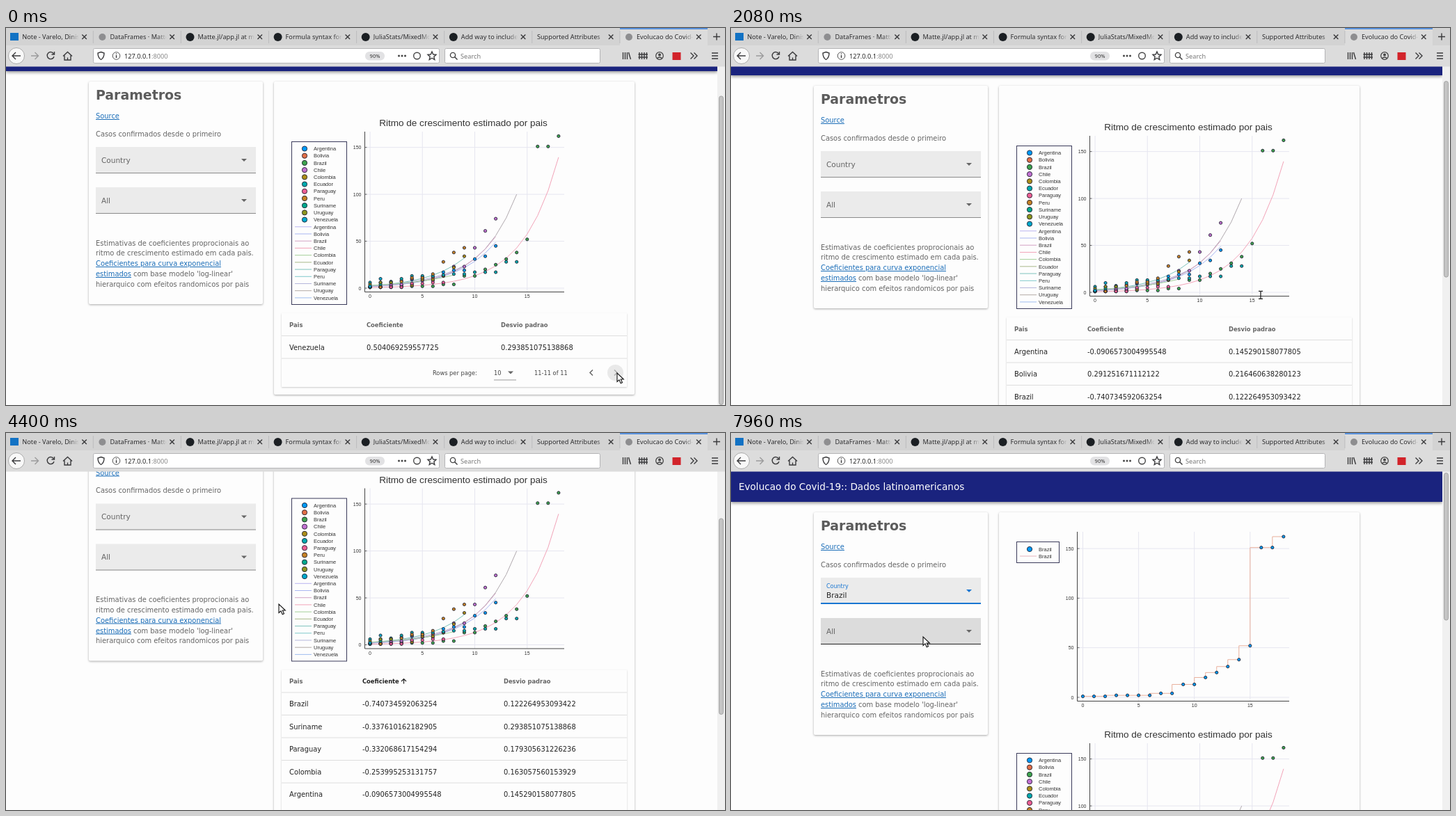
Recreate the animation shown at these times as an HTML page. Size 1033 by 542 pixels, loop 8 s.

```html
<!DOCTYPE html>
<html lang="pt">
<head>
<meta charset="utf-8">
<style>
html, body { margin: 0; height: 100%; overflow: hidden; background: #fdfdfd; }
svg { display: block; }
#view { font-family: "DejaVu Sans", sans-serif; }
.plot { font-family: "Liberation Sans", sans-serif; fill: #333; }
.ui { font: 9.2px "Noto Sans", sans-serif; }
.card { filter: drop-shadow(0 1px 1.5px #0005); }
.table { filter: drop-shadow(0 1px 1px #0003); }
.menu { filter: drop-shadow(0 3px 4px #0007); }
.icon { fill: none; stroke: #3a3a3c; stroke-width: 1.4; }
</style>
</head>
<body>
<svg id="view" width="1033" height="542" viewBox="0 0 1033 542"></svg>
<script>
const view = document.getElementById('view');
const GREY = '#646464', DARK = '#222', BLUE = '#1976d2', LINK = '#1a6db8', PAPER = '#fdfdfd', TABS = '#d3d3d3', BAR = '#dcdcdc';

// SVG helpers
const rect = (x, y, w, h, fill, more = '') => `<rect x="${x}" y="${y}" width="${w}" height="${h}" fill="${fill}" ${more}/>`;
const circle = (x, y, r, fill, more = '') => `<circle cx="${x}" cy="${y}" r="${r}" fill="${fill}" ${more}/>`;
const path = (d, more = 'class="icon"') => `<path d="${d}" ${more}/>`;
const line = (x1, y1, x2, y2, stroke, w = 1) => path(`M${x1} ${y1}L${x2} ${y2}`, `fill="none" stroke="${stroke}" stroke-width="${w}"`);
const text = (x, y, s, size, fill, more = '') => `<text x="${x}" y="${y}" font-size="${size}" fill="${fill}" ${more}>${s}</text>`;
const group = (s, more) => `<g ${more}>${s}</g>`;
const caret = (x, y, fill = '#666') => path(`M${x - 4} ${y - 2}h8l-4 4z`, `fill="${fill}"`);
const BOLD = 'font-weight="bold"', MID = 'text-anchor="middle"', END = 'text-anchor="end"';

// ---- data ----
const countries = ['Argentina', 'Bolivia', 'Brazil', 'Chile', 'Colombia', 'Ecuador', 'Paraguay', 'Peru', 'Suriname', 'Uruguay', 'Venezuela'];
const colors = ['#009afa', '#e36f47', '#3ea44e', '#c371d2', '#ac8e18', '#00aaae', '#ed5e93', '#c68225', '#00a98d', '#8e971e', '#00a9cc'];
const lineColors = ['#b9b4f0', '#a9b6f2', '#d3a3c4', '#f2a3b8', '#a5cf9a', '#a9b98a', '#7fc4bd', '#7fc9cc', '#b4b6dc', '#b3aaa6', '#9fbdf0'];
const brazil = [1, 1, 1, 2, 2, 2, 2, 4, 4, 13, 13, 20, 25, 31, 38, 52, 151, 151, 162];
const cases = [
  [1, 1, 2, 8, 9, 12, 12, 17, 19, 19, 31, 34, 45],
  [2, 2, 3, 3, 10, 10, 11],
  brazil,
  [1, 1, 4, 4, 4, 8, 8, 13, 23, 23, 43, 61, 74],
  [1, 1, 1, 1, 3, 9, 9, 13, 22, 34],
  [6, 6, 7, 10, 13, 13, 13, 14, 15, 15, 17, 17, 17, 28, 28],
  [1, 1, 1, 1, 5, 5, 6, 6],
  [1, 1, 6, 7, 11, 11, 15, 28, 38, 43],
  [1, 4],
  [4, 6, 6],
  [2, 10]
];
// fitted curves: last day, value there, growth rate, colour
const fits = [
  [18, 139.5, .295, '#f2a3b8'], [14, 100, .29, '#b0a9ae'], [12, 55, .28, '#d3a3c4'],
  [12, 49, .27, '#a9b6f2'], [9, 32, .28, '#7fc4bd'], [9, 24, .25, '#b4b6dc'], [8, 14, .2, '#a5cf9a']
];
const values = {
  Argentina: ['-0.0906573004995548', '0.145290158077805'],
  Bolivia: ['0.291251671112122', '0.216460638280123'],
  Brazil: ['-0.740734592063254', '0.122264953093422'],
  Chile: ['0.0534670252872249', '0.145290158077805'],
  Colombia: ['-0.253995253131757', '0.163057560153929'],
  Suriname: ['-0.337610162182905', '0.293851075138868'],
  Paraguay: ['-0.332068617154294', '0.179305631226236'],
  Venezuela: ['0.504069259557725', '0.293851075138868']
};
const byName = countries.slice(0, 5);
const byValue = ['Brazil', 'Suriname', 'Paraguay', 'Colombia', 'Argentina'];
const options = ['Brazil', 'Uruguay', 'Argentina', 'Chile', 'Paraguay', 'Peru'];

// ---- charts ----
function axes(left, top, bottom, X, Y) {
  let s = '';
  for (const d of [0, 5, 10, 15]) {
    s += line(X(d), top, X(d), bottom, '#e6e6f0') + text(X(d), bottom + 8.5, d, 7, '#333', MID);
  }
  for (const v of [0, 50, 100, 150]) {
    s += line(left, Y(v), 802, Y(v), '#e6e6f0') + line(left, Y(v), left + 3, Y(v), '#444', .8) + text(left - 5, Y(v) + 2.6, v, 7, '#333', END);
  }
  return s + path(`M${left} ${top}V${bottom}H802`, 'fill="none" stroke="#444"');
}
const dot = (x, y, fill) => circle(x, y, 2.1, fill, 'stroke="#223" stroke-width=".9"');
const mark = (y, fill) => circle(429, y, 3.6, fill, 'stroke="#223" stroke-width=".9"');
const label = (y, s) => text(442, y + 2.7, s, 7.5, '#333');
const legendBox = (y, w, h) => rect(410.5, y, w, h, PAPER, 'stroke="#3a3a5a"');

function mainChart() {
  const X = d => 523 + d * 15.05, Y = v => 411 - v * 1.349;
  let s = text(657, 178, 'Ritmo de crescimento estimado por pais', 13.55, '#333', MID);
  s += axes(515.5, 186, 416.5, X, Y);
  for (const [last, top, k, color] of fits) {
    let d = '';
    for (let i = 0; i <= last; i++) d += (i ? 'L' : 'M') + X(i) + ' ' + Y(top * Math.exp(k * (i - last)));
    s += path(d, `fill="none" stroke="${color}"`);
  }
  cases.forEach((list, c) => list.forEach((v, i) => s += dot(X(i), Y(v), colors[c])));
  s += legendBox(200.5, 79, 234);
  countries.forEach((name, i) => {
    const y = 210.5 + i * 10.21, y2 = y + 112.3;
    s += mark(y, colors[i]) + label(y, name) + line(415, y2, 439, y2, lineColors[i]) + label(y2, name);
  });
  return group(s, 'class="plot"');
}

function brazilChart() {
  const X = d => 505.5 + d * 16.02, Y = v => 380 - v * 1.426;
  let d = `M${X(0)} ${Y(1)}`;
  brazil.forEach((v, i) => d += `V${Y(v)}H${X(i)}`);
  let s = axes(497.5, 142, 385.5, X, Y) + path(d, 'fill="none" stroke="#e9b09c"');
  brazil.forEach((v, i) => s += dot(X(i), Y(v), colors[0]));
  s += legendBox(156.5, 61, 30) + mark(167, colors[0]) + label(167, 'Brazil') + line(415, 177, 439, 177, '#e6b3bd') + label(177, 'Brazil');
  return group(s, 'class="plot"');
}
const MAIN = mainChart(), EXTRA = brazilChart();

// ---- page ----
function select(y, name, value, hover, focus) {
  const color = focus ? BLUE : '#666';
  return rect(129, y, 230, 38, hover ? '#dcdcdc' : '#ebebeb') +
    rect(129, y + (focus ? 36 : 37), 230, focus ? 2 : 1, focus ? BLUE : hover ? '#222' : '#8a8a8a') +
    (value ? text(137, y + 15, name, 8, color) + text(137, y + 29, value, 10.5, DARK) : text(137, y + 22.5, name, 10.5, GREY)) +
    caret(342, y + 19, color);
}

function leftCard(p) {
  const body = (y, s) => text(129, y, s, 9.9, GREY);
  const link = s => `<tspan fill="${LINK}" text-decoration="underline">${s}</tspan>`;
  return rect(119, 114, 250, 320, PAPER, 'rx="2" class="card"') +
    text(129, 140, 'Parametros', 18.9, '#5c5c5c', BOLD) +
    body(167, link('Source')) +
    body(192.5, 'Casos confirmados desde o primeiro') +
    select(208, 'Country', p.chosen && 'Brazil', p.hoverCountry, p.chosen) +
    select(266, 'All', '', p.hoverAll) +
    body(349.5, 'Estimativas de coeficientes proprocionais ao') +
    body(364, 'ritmo de crescimento estimado em cada pais.') +
    body(379, link('Coeficientes para curva exponencial')) +
    body(394, link('estimados') + " com base modelo 'log-linear'") +
    body(408.5, 'hierarquico com efeitos randomicos por pais');
}

const sortArrow = (x, color) => path(`M${x} 467v-7M${x - 3.5} 463.500l3.500-3.500l3.500 3.500`, `fill="none" stroke="${color}" stroke-width="1.2"`);

function table(p) {
  const one = p.rows === 1, x2 = one ? 518 : 512, x3 = one ? 711 : 715, end = 479.5 + p.rows * 32.5;
  const head = (x, s, color = GREY) => text(x, 466.5, s, 8.35, color, BOLD);
  let s = rect(396, 447, 496, end - 406, PAPER, 'class="table"') +
    head(407, 'Pais') + head(x2, 'Coeficiente', p.sorted ? DARK : GREY) + head(x3, 'Desvio padrao') +
    (p.arrow2 ? sortArrow(571.5, p.sorted ? DARK : '#ccc') : '') + (p.arrow3 ? sortArrow(789.5, '#ddd') : '');
  (one ? ['Venezuela'] : p.sorted ? byValue : byName).forEach((name, i) => {
    const y = 479.5 + i * 32.5;
    if (i === p.hoverRow) s += rect(396, y, 496, 32.5, '#eaeaea');
    s += line(396, y, 892, y, '#dedede');
    [name, ...values[name]].forEach((v, c) => s += text([407, x2, x3][c], y + 20.2, v, 9.9, DARK));
  });
  s += line(396, end, 892, end, '#dedede');
  const small = (x, str) => text(x, end + 23.5, str, 8.25, '#444');
  const chevron = (x, k, color) => path(`M${x - 2 * k} ${end + 16.5}l${4 * k} 4l${-4 * k} 4`, `fill="none" stroke="${color}" stroke-width="1.5"`);
  return s + small(613, 'Rows per page:') + small(701, '10') + line(701, end + 31, 733, end + 31, '#999') + caret(725, end + 20.5) +
    small(759, one ? '11-11 of 11' : '1-10 of 11') + chevron(841, -1, '#666') +
    (one ? circle(875.5, end + 20.5, 11.5, '#e9e9e9') : '') + chevron(876, 1, one ? '#aaa' : '#666');
}

function menu(p) {
  let s = rect(129, 208, 229, 205, PAPER, 'class="menu"');
  options.forEach((name, i) => {
    const y = 213 + i * 32.5;
    if (i === p.hoverOption) s += rect(129, y, 218, 32.5, '#f2f2f2');
    s += text(140, y + 20.3, name, 10.4, DARK);
  });
  s += rect(347, 208, 11, 205, '#f0f0f0') + rect(349.5, 210, 7, 102, '#bdbdbd', 'rx="3.5" stroke="#999" stroke-width=".6"');
  return group(s, `opacity="${p.menu}"`);
}

function scrollbar(scroll, height) {
  const thumb = 486 * 486 / height - 8;
  return rect(1022, 55, 11, 487, '#f0f0f0') +
    rect(1024.5, 57.5 + scroll * (484 - thumb) / (height - 486), 6, thumb, '#c4c4c4', 'rx="3" stroke="#999" stroke-width=".8"');
}

function page(p) {
  const shift = p.extra ? 260 : 0;
  const s = rect(0, 40, 1022, 59, '#1a237e', 'style="filter:drop-shadow(0 2px 2px #0006)"') +
    text(11, 82, 'Evolucao do Covid-19:: Dados latinoamericanos', 13.55, '#fff') +
    leftCard(p) +
    rect(385, 114, 518, 417.5 + p.rows * 32.5 + shift, PAPER, 'rx="2" class="card"') +
    (p.extra ? EXTRA : '') + group(MAIN + table(p), `transform="translate(0 ${shift})"`) +
    (p.menu ? menu(p) : '');
  return rect(0, 0, 1033, 542, PAPER) + group(s, `transform="translate(0 ${-p.scroll})"`) +
    scrollbar(p.scroll, 490.5 + p.rows * 32.5 + shift);
}

// ---- browser frame ----
function browser() {
  const titles = ['Note - Varelo, Dinis', 'DataFrames · Matte.jl', 'Matte.jl/app.jl at master', 'Formula syntax for', 'JuliaStats/MixedModels', 'Add way to include', 'Supported Attributes', 'Evolucao do Covid-19'];
  let s = rect(0, 0, 1033, 26, TABS) + rect(0, 25, 1033, 30.5, BAR) + rect(882, 0, 126, 26, BAR) + rect(882, 0, 126, 2, '#5a92dc');
  titles.forEach((title, i) => {
    const x = 882 - 126.1 * (7 - i), tx = i === 6 ? 7 : 24;
    s += `<svg x="${x + tx}" y="0" width="${105 - tx}" height="25"><text y="16" fill="#2c2c2e">${title}</text></svg>`;
    s += rect(x + 92, 3, 15, 20, `url(#fade${i === 7 ? 1 : 0})`);
    if (i === 0) s += rect(6, 7, 12, 11, '#1272c4');
    else if (i === 1 || i === 7) s += circle(x + 13, 13, 5, '#8e8e90');
    else if (i !== 6) s += circle(x + 13, 13, 6, '#1b1f23');
    s += path(`M${x + 110} 9.5l6.5 6.5m0-6.5l-6.5 6.5`);
    if (i < 7) s += line(x + 126, 4, x + 126, 22, '#bcbcbe');
  });
  s += path('M1016 12.5h10M1021 7.5v10');
  // navigation
  s += circle(15, 40, 11.5, '#f8f8f8', 'stroke="#aaa"') + path('M21 40H9.5M14 35l-5 5l5 5') +
    group(path('M36 40h10M41.5 35l5 5l-5 5'), 'opacity=".4"') +
    path('M68.5 37a5 5 0 1 0 .5 4M69.5 34v4h-4') + path('M82 40.5l6.5-6l6.5 6M84 39.5v6.5h9v-6.5M88.5 46v-3.5');
  // address bar
  s += rect(125.5, 29.5, 497, 21, '#fff', 'rx="2" stroke="#b4b4b6"') +
    path('M136.5 34.5l4.5 1.5c0 5-1 7.5-4.5 9.5c-3.5-2-4.5-4.5-4.5-9.5z') +
    circle(158.5, 40, 5.3, 'none', 'stroke="#555"') + path('M158.5 39v4M158.5 36.5v1.2') +
    `<text x="170" y="43.5" fill="#222">127.0.0.1<tspan fill="#888">:8000</tspan></text>` +
    rect(516, 34, 28, 12.5, '#e2e2e4', 'rx="6"') + text(530, 43, '90%', 7.5, '#333', MID) +
    [564.5, 569, 573.5].map(x => circle(x, 40, 1.5, '#444')).join('') +
    circle(590.5, 40, 4.8, 'none', 'stroke="#444" stroke-width="1.4"') +
    path('M612 34l1.8 4l4.2 .4l-3.2 2.8l1 4.3l-3.8-2.3l-3.8 2.3l1-4.3l-3.2-2.8l4.2-.4z');
  // search and toolbar
  s += rect(630.5, 29.5, 223, 21, '#fff', 'rx="2" stroke="#b4b4b6"') + circle(642, 39, 3.6, 'none', 'stroke="#444" stroke-width="1.4"') +
    path('M644.5 41.5l4 4') + text(653, 43.5, 'Search', 9.2, '#777') +
    path('M886.5 35v10M889.5 35v10M892.5 35v10M894.5 35l3 10') +
    path('M910 35v10M913.5 35v10M917 35v10M920.5 35v10M908.5 38h13.5M908.5 42h13.5') +
    circle(939, 40, 5.3, 'none', 'stroke="#444" stroke-width="1.3"') + circle(939, 38.5, 2, '#444') + path('M935.5 43.5q3.5-3 7 0') +
    rect(957.5, 35, 12, 11, '#d2232a') + path('M983.5 35.5l4.5 4.5l-4.5 4.5M988.5 35.5l4.5 4.5l-4.5 4.5') +
    path('M1014 36h9M1014 40h9M1014 44h9');
  const fade = (i, c) => `<linearGradient id="fade${i}"><stop stop-color="${c}" stop-opacity="0"/><stop offset=".9" stop-color="${c}"/></linearGradient>`;
  return `<defs>${fade(0, TABS)}${fade(1, BAR)}</defs>` + group(s, 'class="ui"');
}

const pointers = {
  arrow: path('M0 0v12.5l3-2.7l2.2 5l2.3-1l-2.2-4.8h4z', 'fill="#fff" stroke="#111" stroke-width="1.1"'),
  hand: path('M0 1.2q1-1.6 2.2 0v4l5.8 1.3v3.5l-1.2 2.5h-6l-3.6-4.5q.6-1.4 2.8 .2z', 'fill="#fff" stroke="#111" stroke-width="1.1"'),
  beam: path('M-3-5.5h2.3l.7 .7l.7-.7h2.3M-3 5.5h2.3l.7-.7l.7 .7h2.3M0-5v10', 'fill="none" stroke="#222" stroke-width="1.3"')
};

// ---- timeline: [ms, values...] ----
const moves = [[40, 878, 496], [440, 843, 493], [1440, 843, 493], [1800, 782, 463], [2200, 752, 350], [2280, 735, 352], [2400, 595, 374], [2680, 541, 352], [3640, 541, 352],
  [4400, 392, 246], [4520, 372, 240], [5119, 372, 240], [5120, 316, 226], [5360, 316, 226], [6040, 267, 264], [6400, 205, 226], [6960, 205, 226], [7800, 276, 293]];
const scrolls = [[1640, 37], [1800, 16.5], [1920, 0], [2000, 0], [2280, 108.5], [4360, 108.5], [4400, 106.5], [4520, 60], [5119, 60], [5120, 0]];
const shapes = [[0, 'arrow'], [400, 'hand'], [1520, 'beam'], [2120, 'arrow'], [2600, 'hand'], [3760, 'arrow'], [5120, 'hand'], [7120, 'arrow']];

function track(keys, t) {
  const i = keys.findIndex(k => k[0] > t);
  if (i < 0) return keys.at(-1).slice(1);
  if (!i) return keys[0].slice(1);
  const a = keys[i - 1], b = keys[i], f = (t - a[0]) / (b[0] - a[0]);
  return a.slice(1).map((v, j) => v + (b[j + 1] - v) * f);
}
const during = (t, a, b) => t >= a && t < b;

view.innerHTML = '<g id="page"></g>' + browser() + '<g id="pointer"></g>';
const pageEl = document.getElementById('page'), pointerEl = document.getElementById('pointer');

function draw(t) {
  const [x, y] = track(moves, t), [scroll] = track(scrolls, t);
  const inTable = x > 396 && x < 892;
  pageEl.innerHTML = page({
    scroll,
    rows: t < 560 ? 1 : 10,
    sorted: t >= 3280,
    arrow2: t >= 2600,
    arrow3: during(t, 2160, 2440),
    hoverRow: inTable ? Math.floor((y + scroll - 479) / 32.5) : -1,
    hoverCountry: during(t, 5120, 5480),
    hoverAll: t >= 7680,
    chosen: t >= 6960,
    extra: t >= 7280,
    menu: during(t, 5400, 6960) ? Math.min(1, (t - 5360) / 160) : 0,
    hoverOption: Math.floor((y - 213) / 32.5)
  });
  pointerEl.innerHTML = pointers[shapes.findLast(s => s[0] <= t)[1]];
  pointerEl.setAttribute('transform', `translate(${x} ${y})`);
}

let last = -1;
function tick() {
  const t = Math.floor(performance.now() % 8000 / 40) * 40;
  if (t !== last) draw(last = t);
  requestAnimationFrame(tick);
}
tick();
</script>
</body>
</html>
```
